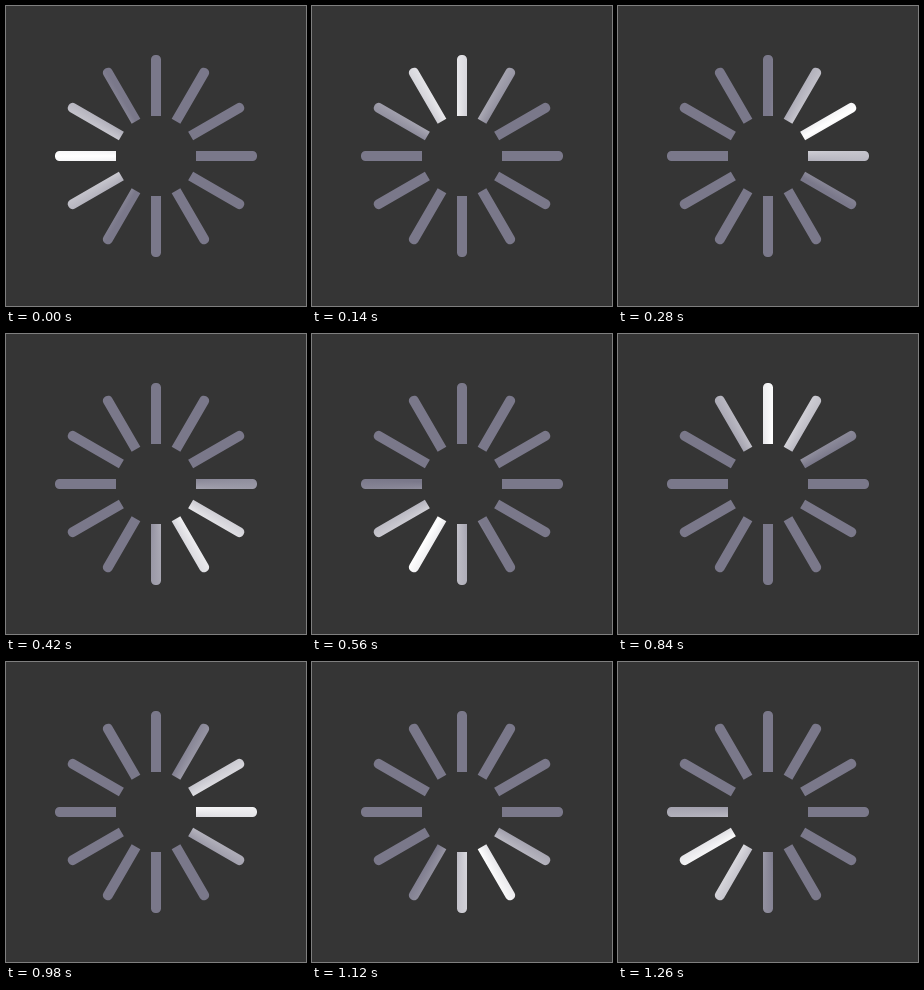
An HTML page with a canvas for the animation above (1.33 s loop, 300 by 300 pixels).

```html
<!DOCTYPE html>
<html lang="en">
<head>
<meta charset="utf-8">
<title>Spinner</title>
<style>
  html, body { margin: 0; width: 100%; height: 100%; overflow: hidden; background: #353535; }
  canvas { display: block; width: 300px; height: 300px; }
</style>
</head>
<body>
<canvas id="stage" width="300" height="300"></canvas>
<script>
const ctx = document.getElementById("stage").getContext("2d");
const TAU = Math.PI * 2;
const CENTER = 150;
const BARS = 12, INNER = 40, OUTER = 101, THICK = 10;
const STEPS = 19, STEP_MS = 70, TURNS = 2;
const BACK = "#353535", BASE = "#7a788a", GLOW = "#ffffff";
const SPREAD = 60 / 360; // the glow fades out this far to either side

function glowGradient(angle) {
  // The seam lies opposite the highlight, so the peak sits at the middle.
  const fill = ctx.createConicGradient(angle - Math.PI, CENTER, CENTER);
  fill.addColorStop(0, BASE);
  fill.addColorStop(0.5 - SPREAD, BASE);
  fill.addColorStop(0.5, GLOW);
  fill.addColorStop(0.5 + SPREAD, BASE);
  fill.addColorStop(1, BASE);
  return fill;
}

function traceBars() {
  ctx.beginPath();
  for (let i = 0; i < BARS; i++) {
    ctx.save();
    ctx.translate(CENTER, CENTER);
    ctx.rotate(i * TAU / BARS);
    ctx.roundRect(INNER, -THICK / 2, OUTER - INNER, THICK, [0, 4.5, 4.5, 0]);
    ctx.restore();
  }
}

function draw(now) {
  const step = Math.floor(now / STEP_MS) % STEPS;
  ctx.fillStyle = BACK;
  ctx.fillRect(0, 0, 300, 300);
  traceBars();
  ctx.fillStyle = glowGradient(Math.PI + step * TURNS * TAU / STEPS);
  ctx.fill();
}

const start = performance.now();
function tick() {
  draw(performance.now() - start);
  requestAnimationFrame(tick);
}
tick();
</script>
</body>
</html>
```
